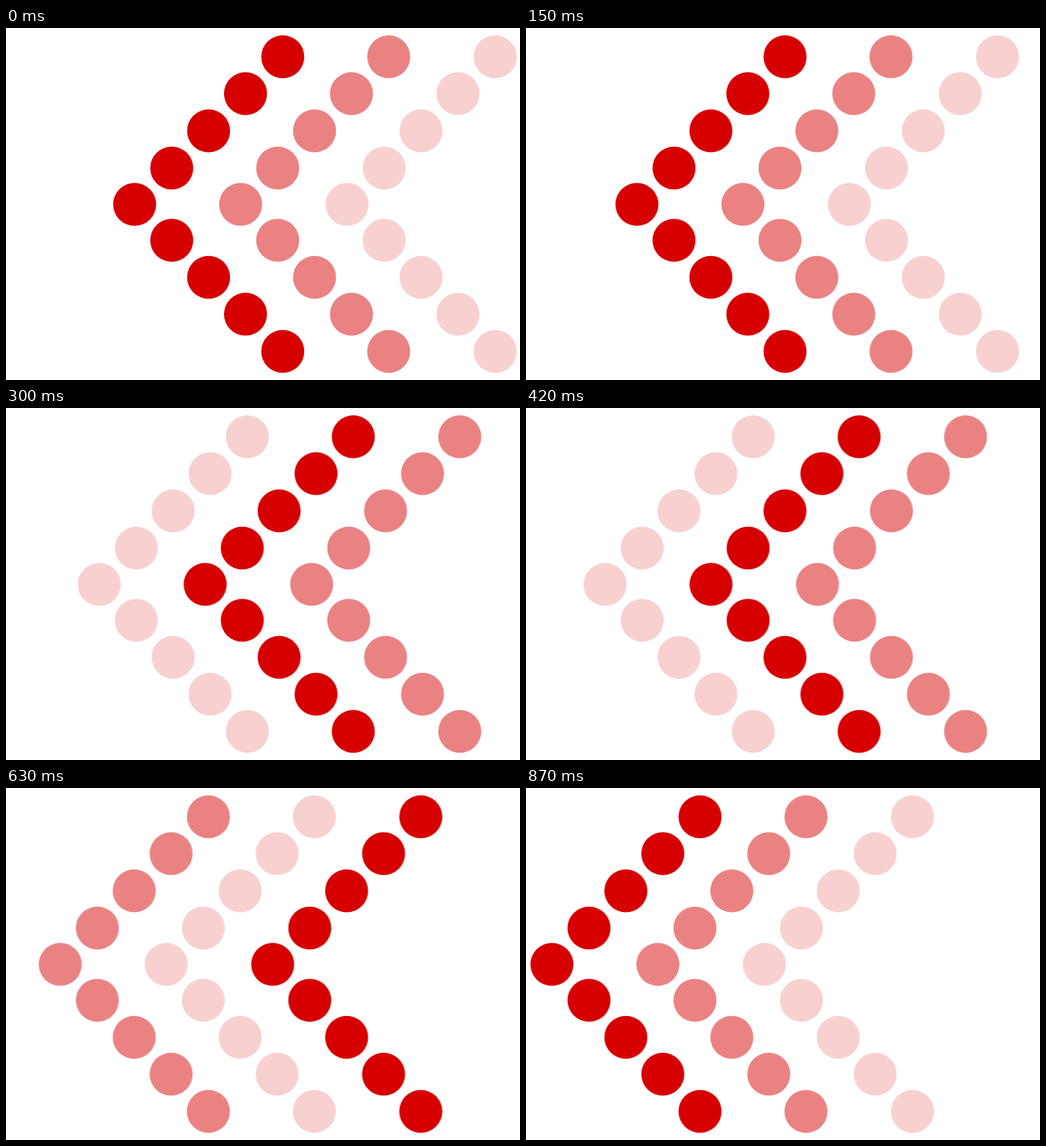
Write an HTML page that moves like this. It is 700 by 480 pixels and loops after 900 ms.

```html
<!DOCTYPE html>
<html lang="en">
<head>
<meta charset="utf-8">
<title>Chasing arrows</title>
<style>
  html, body { margin: 0; width: 100%; height: 100%; overflow: hidden; background: #fff; }
  svg { display: block; width: 700px; height: 480px; }

  :root {
    --full: rgb(215, 0, 0);
    --half: rgb(235, 130, 130);
    --faint: rgb(248, 208, 208);
  }

  .row { animation: slide 900ms steps(30) infinite; }
  .row use { animation: chase 900ms linear infinite; }
  .row use:nth-child(2) { animation-delay: -600ms; }
  .row use:nth-child(3) { animation-delay: -300ms; }

  /* one arrow spacing per loop */
  @keyframes slide {
    to { transform: translateX(-144.75px); }
  }

  @keyframes chase {
    0%, 19.44% { fill: var(--full); }
    28.33%, 52.78% { fill: var(--faint); }
    61.67%, 86.11% { fill: var(--half); }
    95%, 100% { fill: var(--full); }
  }
</style>
</head>
<body>
<svg viewBox="0 0 700 480">
  <defs>
    <g id="arrow">
      <circle cx="201.7" cy="39.3" r="29.3"/>
      <circle cx="151" cy="89.5" r="29.3"/>
      <circle cx="100.7" cy="140.2" r="29.3"/>
      <circle cx="50.5" cy="191" r="29.3"/>
      <circle cx="0" cy="240.5" r="29.3"/>
      <circle cx="50.5" cy="289.5" r="29.3"/>
      <circle cx="100.7" cy="340" r="29.3"/>
      <circle cx="151" cy="390.3" r="29.3"/>
      <circle cx="201.7" cy="441" r="29.3"/>
    </g>
  </defs>
  <g class="row">
    <use href="#arrow" x="175.2"/>
    <use href="#arrow" x="319.5"/>
    <use href="#arrow" x="464.5"/>
  </g>
</svg>
</body>
</html>
```
